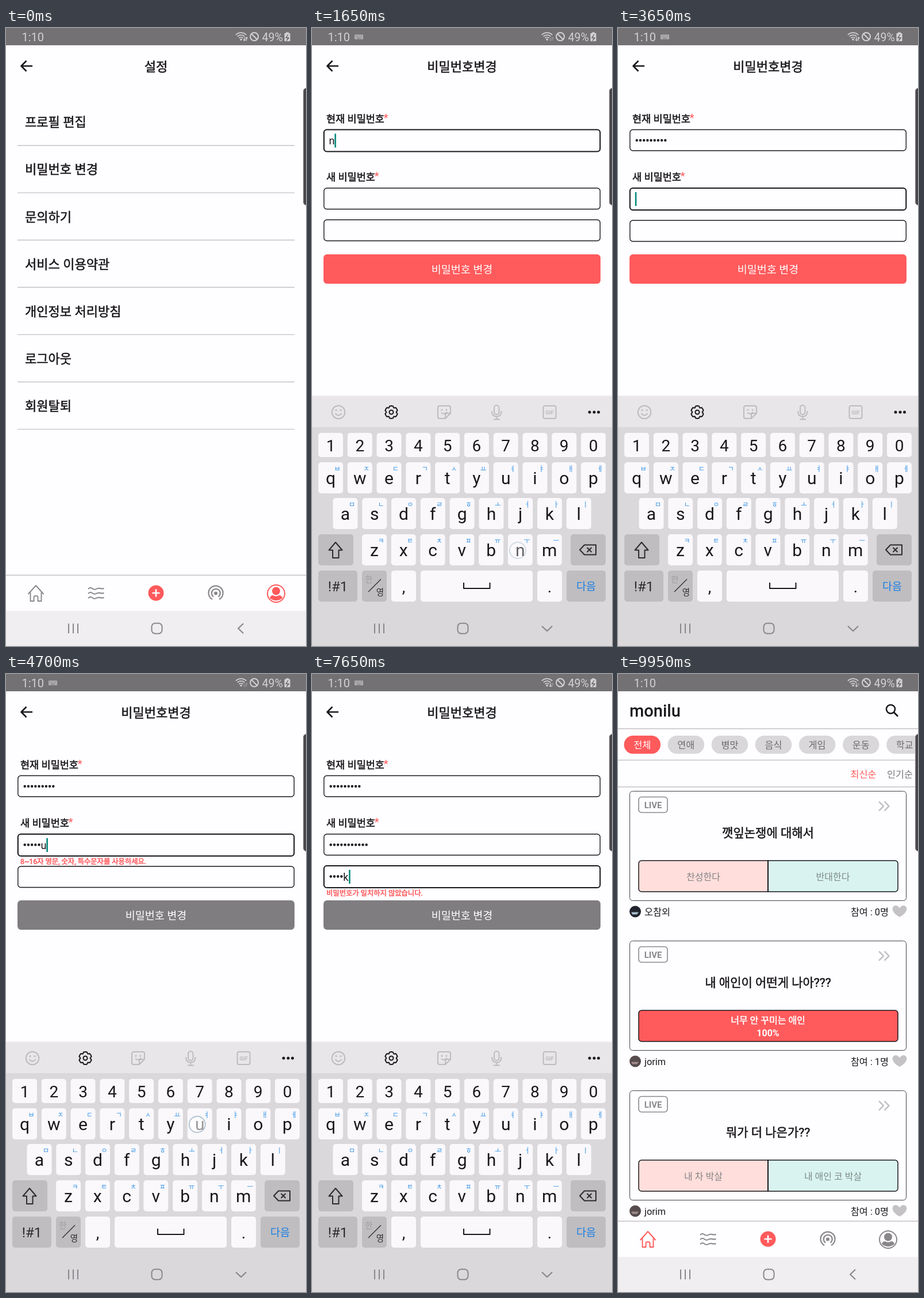
These frames come from a looping animation (522x1073 px, 10000 ms). An HTML page:

```html
<!DOCTYPE html>
<html lang="ko">
<head>
<meta charset="utf-8">
<style>
html, body { margin: 0; width: 100%; height: 100%; overflow: hidden; background: #fefdff; }
svg { display: block; width: 522px; height: 1073px; font-family: Roboto, "Noto Sans CJK KR", "Noto Sans CJK", sans-serif; }
</style>
</head>
<body>
<svg id="stage" viewBox="0 0 522 1073"></svg>
<script>
const BG = '#fefdff', RED = '#ff5a5c', GREY = '#89878b', INK = '#19171a', PALE = '#c4c2c5', KEY = '#faf8fb';
const LOOP = 10000;

// Drawing helpers
const esc = s => s.replace(/&/g, '&amp;').replace(/</g, '&lt;');
const text = (s, x, y, size, fill = INK, anchor = 'start', extra = '') =>
  `<text x="${x}" y="${y}" font-size="${size}" fill="${fill}" text-anchor="${anchor}" ${extra}>${esc(s)}</text>`;
const mid = (s, x, y, size, fill, extra) => text(s, x, y, size, fill, 'middle', extra);
const medium = (c = INK) => `stroke="${c}" stroke-width=".55"`;
const rect = (x, y, w, h, r, fill, stroke = 'none', sw = 1) =>
  `<rect x="${x}" y="${y}" width="${w}" height="${h}" rx="${r}" fill="${fill}" stroke="${stroke}" stroke-width="${sw}"/>`;
const path = (d, stroke, sw = 2, fill = 'none') =>
  `<path d="${d}" stroke="${stroke}" stroke-width="${sw}" fill="${fill}" stroke-linejoin="round"/>`;
const circle = (x, y, r, fill, stroke = 'none', sw = 2) =>
  `<circle cx="${x}" cy="${y}" r="${r}" fill="${fill}" stroke="${stroke}" stroke-width="${sw}"/>`;
const group = (body, opacity, dy = 0) => `<g opacity="${opacity}" transform="translate(0 ${dy})">${body}</g>`;
const line = (y, x1 = 0, x2 = 522) => path(`M${x1} ${y}H${x2}`, PALE, 1.4);
const page = body => rect(0, 30, 522, 982, 0, BG) + body;
const ease = (t, a, b) => { const p = Math.min(1, Math.max(0, (t - a) / (b - a))); return 1 - (1 - p) ** 3; };

// Status bar, tabs, navigation
function statusBar(t, typing) {
  const c = '#d3d1d4', busy = +'3033003111'[Math.floor(t / 1000)];
  let s = rect(0, 0, 522, 30, 0, '#737174') + text('1:10', 27.5, 22.5, 20, c) + text('49%', 445.5, 22.5, 19.5, c);
  for (const r of [13, 9, 5]) s += path(`M${409 - .7 * r} ${21 - .7 * r}A${r} ${r} 0 0 1 ${409 + .7 * r} ${21 - .7 * r}`, c, 1.8);
  s += circle(409, 20, 1.8, c);
  s += group(path('M415 16v6m-2-2l2 2l2-2', c, 1.3), busy & 1 ? 1 : .35);
  s += group(path('M418.500 22v-6m-1.500 2l1.500-2l2 2', c, 1.3), busy & 2 ? 1 : .35);
  s += circle(432, 15, 7, 'none', c) + path('M427 10L437 20', c);
  s += rect(484.500, 9, 10, 14, 1, c) + rect(487, 7.500, 5, 2, 0, c) + path('M491 11L487 17H492L488 22', '#5d5b5e', 1.3);
  if (typing) {
    s += rect(74, 11.5, 15, 8, 1, '#b5b3b6');
    for (let i = 0; i < 10; i++) s += rect(75.500 + i % 5 * 2.6, 13 + Math.floor(i / 5) * 2.4, 1.2, 1.2, 0, '#737174');
    s += rect(78, 17.600, 7, 1, 0, '#737174');
  }
  return s;
}

function tabs(home) {
  const h = home ? RED : GREY, p = home ? GREY : RED;
  let s = rect(0, 949, 522, 63, 0, BG) + line(950);
  s += path('M38.500 983L52 968L65.500 983M42.500 980V995H48.500V988Q48.500 986 52 986T55.500 988V995H61.500V980', h, 1.9);
  for (const y of [974, 982, 990]) s += path(`M143 ${y}q3.500 -4 7 -1t7 1t7 -1t6.500 0`, GREY, 2);
  s += circle(261, 981, 13.5, RED) + path('M261 974.500V987.500M254.500 981H267.500', '#fff', 2.6);
  s += path('M359 992A12.500 12.500 0 1 1 371 992M361 987.500A7.500 7.500 0 1 1 369.500 987.500', GREY, 2.3) + circle(365, 981.500, 3, GREY);
  s += circle(470, 982, 15, 'none', p, 2) + circle(470, 977.500, 7, p) + path('M459 990Q460 985 465 985Q470 988 475 985Q480 985 481 990Q470 998 459 990Z', 'none', 0, p);
  return s;
}

const navIcons = down => path('M109 1034V1051M117 1034V1051M125 1034V1051', GREY)
  + rect(253.5, 1033.5, 18, 18, 6, 'none', GREY, 2)
  + path(down ? 'M400 1038.500L409 1047L418 1038.500' : 'M413 1034L404 1042.500L413 1051', GREY, 2.2);

const header = title => path('M46 66H27M35.500 57L26.500 66L35.500 75', INK, 2.6) + mid(title, 261, 74.5, 22, INK, medium());

// Pages
const rows = ['프로필 편집', '비밀번호 변경', '문의하기', '서비스 이용약관', '개인정보 처리방침', '로그아웃', '회원탈퇴'];
const settings = page(header('설정') + rows.map((s, i) =>
  text(s, 33, 171.3 + 82.15 * i, 22, INK, 'start', medium()) + line(204 + 82.1 * i, 20, 502)).join(''));

const heart = (x, y, k, stroke, sw, fill) =>
  path(`M${x} ${y + 9.5 * k}C${x - 24 * k} ${y - 4 * k} ${x - 7 * k} ${y - 18 * k} ${x} ${y - 6 * k}C${x + 7 * k} ${y - 18 * k} ${x + 24 * k} ${y - 4 * k} ${x} ${y + 9.5 * k}Z`, stroke, sw, fill);

function card(y, title, options, user, votes, tones) {
  let s = rect(20.500, y, 481, 190, 5, BG, '#444246') + rect(36, y + 10, 50, 27, 5, 'none', GREY, 1.6);
  s += mid('LIVE', 61, y + 29.5, 15, GREY, 'font-weight="700"');
  s += path(`M454 ${y + 18}l8 8l-8 8M463.500 ${y + 18}l8 8l-8 8`, PALE, 2.5) + mid(title, 261, y + 79.5, 21, INK, medium());
  if (options.length > 1) {
    s += path(`M261 ${y + 120.5}H41a5 5 0 0 0 -5 5v44a5 5 0 0 0 5 5H261Z`, INK, 1.5, '#ffdedb');
    s += path(`M261 ${y + 120.5}H482a5 5 0 0 1 5 5v44a5 5 0 0 1 -5 5H261Z`, INK, 1.5, '#d9f4f0');
    s += path(`M261 ${y + 120}v55`, INK, 2);
    s += mid(options[0], 148.5, y + 154, 16, '#858286') + mid(options[1], 374, y + 154, 16, '#7d8886');
  } else {
    s += rect(36, y + 120.500, 451, 54, 5, RED, INK, 1.5);
    s += mid(options[0], 261, y + 143, 16, '#fff', medium('#fff')) + mid('100%', 261, y + 165.500, 16, '#fff', 'font-weight="700"');
  }
  s += circle(30, y + 209, 10, tones[0]) + path(`M23 ${y + 210}h13l-3 4h-8Z`, 'none', 0, tones[1]);
  s += text(user, 46, y + 215, 16.3) + text(`참여 : ${votes}명`, 471, y + 215, 16.3, INK, 'end');
  return s + heart(490, y + 209, 1, 'none', 0, PALE);
}

function homePage() {
  let s = text('monilu', 20, 73.5, 29, INK, 'start', 'font-weight="500"');
  s += circle(474.500, 61, 7.5, 'none', INK, 2.5) + path('M480 66.500L487 73.500', INK, 2.8);
  s += line(95) + line(149.5) + line(196);
  ['전체', '연애', '병맛', '음식', '게임', '운동', '학교'].forEach((c, i) => {
    const x = 10.500 + 76.1 * i;
    s += rect(x, 107, 63.500, 31.500, 15.7, i ? '#d9d7da' : RED) + mid(c, x + 31.7, 129, 16.3, i ? '#6d6b6e' : '#fff');
  });
  s += text('최신순', 404.5, 179.5, 16.3, RED) + text('인기순', 468, 179.5, 16.3, '#77757a');
  s += card(203.5, '깻잎논쟁에 대해서', ['찬성한다', '반대한다'], '오참외', 0, ['#20242c', '#a9bccb']);
  s += card(463.5, '내 애인이 어떤게 나아???', ['너무 안 꾸미는 애인'], 'jorim', 1, ['#574c4d', '#a08a87']);
  s += card(723.5, '뭐가 더 나은가??', ['내 차 박살', '내 애인 코 박살'], 'jorim', 0, ['#574c4d', '#a08a87']);
  return page(s) + tabs(true);
}
const home = homePage();

// Keyboard
const STEP = 50.78;
const layouts = [false, true].map(sym => [
  ['1234567890', 11, 703, 42],
  [sym ? '+×÷=/_<>♡☆' : 'qwertyuiop', 11, 754, 54, 'ㅂㅈㄷㄱㅅㅛㅕㅑㅐㅔ'],
  [sym ? '!@#~%^&*()' : 'asdfghjkl', sym ? 11 : 36.5, 816, 54, 'ㅁㄴㅇㄹㅎㅗㅓㅏㅣ'],
  [sym ? '–\'":;,?' : 'zxcvbnm', 87, 879, 54, 'ㅋㅌㅊㅍㅠㅜㅡ'],
].flatMap(([chars, x, y, h, hints]) => [...chars].map((c, i) => ({ c, x: x + STEP * i, y, h, hint: sym || !hints ? '' : hints[i] }))));

const radial = (x, y, n, r) => 'M' + Array.from({ length: n }, (_, i) => {
  const a = i / n * 2 * Math.PI - Math.PI / 2;
  return `${(x + r(i) * Math.cos(a)).toFixed(1)} ${(y + r(i) * Math.sin(a)).toFixed(1)}`;
}).join('L') + 'Z';

function glyph(k) {
  const x = k.x + 21.5, y = k.y + 28;
  if (k.c === '♡') return heart(x, y + 1, .9, INK, 2, 'none');
  if (k.c === '☆') return path(radial(x, y + 1, 10, i => i % 2 ? 5 : 12), INK, 1.8);
  return mid(k.c, x, k.y + (k.h < 50 ? 32 : 37.5), /[a-z]/.test(k.c) ? 30 : 28);
}

function keyboard(sym, pressed) {
  const dim = '#bdbbbe', special = '#bfbdc0', dark = '#2d2b2e';
  let s = rect(0, 638, 522, 2, 0, '#efedf0') + rect(0, 640, 522, 440, 0, '#dad8db') + rect(0, 640, 522, 53, 0, '#e8e6e9');
  s += circle(46, 667, 11.3, 'none', dim) + circle(42, 663.500, 1.6, dim) + circle(50, 663.500, 1.6, dim) + path('M40.500 669Q46 676 51.500 669', dim);
  s += path(radial(138, 667, 24, i => (i + 1) % 4 < 3 ? 11 : 8.5), INK, 2) + circle(138, 667, 3.5, 'none', INK);
  s += path('M222 656H238Q241 656 241 659V669L232 678H222Q219 678 219 675V659Q219 656 222 656M241 669H235Q232 669 232 672V678', dim);
  s += circle(226, 663, 1.5, dim) + circle(234, 663, 1.5, dim) + path('M225 668Q230 672 235 667', dim);
  s += rect(317, 655, 8.500, 16, 4.2, 'none', dim, 2) + path('M313 665Q313 674.500 321.300 674.500T329.500 665M321.300 674.500V680M316 679.500H327', dim);
  s += rect(402.5, 656, 22, 22, 3, 'none', dim, 2) + mid('GIF', 413.5, 670.5, 9.5, dim, 'font-weight="700"');
  for (const x of [483, 491, 498.5]) s += circle(x, 667, 2.5, INK);

  for (const k of layouts[+sym]) {
    s += rect(k.x, k.y, 43, k.h, 5, k.c === pressed ? '#a9a7aa' : KEY) + glyph(k);
    if (k.hint) s += mid(k.hint, k.x + 33, k.y + 16, 12, '#3794e6');
  }
  s += rect(11, 879, 61, 54, 5, special) + rect(450, 879, 61, 54, 5, special);
  s += sym ? mid('1/2', 41.5, 915, 24, dark) : path('M41 893L29.500 906.500H36V920H46.500V906.500H52.500Z', dark, 2);
  s += path('M474 897.500H494V914.500H474L466 906Z', dark, 2) + path('M478.500 902l8 8m0-8l-8 8', dark, 2);
  s += rect(11, 942, 68, 54, 5, special) + mid(sym ? 'ABC' : '!#1', 45, 978, 24, dark);
  s += rect(87, 942, 43, 54, 5, special) + mid('한', 99, 963, 14.5, sym ? dark : '#a09ea1') + mid('영', 118.5, 985, 14.5, dark) + path('M98 979L120 957', dark, 1.3);
  s += rect(138, 942, 43, 54, 5, KEY) + mid(',', 159.5, 980, 28) + rect(189, 942, 195, 54, 5, KEY) + path('M264 963V973H309.500V963', INK, 2);
  s += rect(392, 942, 43, 54, 5, KEY) + mid('.', 413.5, 980, 28);
  return s + rect(443, 942, 68, 54, 5, special) + mid('다음', 477, 976, 18.500, '#1a7fe4');
}

function popup(k) {
  const x = Math.max(11, Math.min(433, k.x - 17.5)), y = k.y - 110;
  return rect(x - 1, y + 1, 80, 103, 9, 'rgba(0,0,0,.1)') + rect(x, y, 78, 102, 8, KEY) + mid(k.c, x + 39, y + 68, 42);
}

// Timeline
const OPEN = 1150, CLOSE = 9680;
const fields = [
  { word: 'nodbeum1!', focus: 1100, at: [1580, 1780, 1970, 2150, 2330, 2510, 2690, 2870, 3160] },
  { word: 'sodikumen1!', focus: 3400, at: [3820, 4000, 4180, 4350, 4520, 4690, 4860, 5030, 5200, 5700, 6260] },
  { word: 'sodikumen1!', focus: 6560, at: [6880, 7040, 7190, 7330, 7480, 7800, 7960, 8130, 8320, 8600, 9000] },
];
const switches = [3010, 5930, 8770];
const symbolsAt = t => fields.some((f, i) => t >= switches[i] && t < (fields[i + 1]?.focus ?? LOOP));
const strokes = fields.flatMap(f => f.at.map((t, i) => {
  const key = layouts[+symbolsAt(t)].find(k => k.c === f.word[i]);
  return { t, key, x: key.x + 17, y: key.y + 28 };
}));
const taps = [
  { t: 450, x: 100, y: 246 }, { t: 9560, x: 261, y: 419 },
  ...fields.map((f, i) => ({ t: f.focus, x: 250, y: [196, 297, 352][i] })),
  ...switches.map(t => ({ t, x: 35, y: 962 })),
  ...strokes,
];

function form(t) {
  const active = fields.filter(f => t >= f.focus).length - 1;
  const counts = fields.map(f => f.at.filter(a => t >= a).length);
  const weak = counts[1] > 0 && counts[1] < 11, differ = counts[2] > 0 && counts[2] < 11;
  let s = header('비밀번호변경');
  s += text('현재 비밀번호', 25, 163.5, 17.5, INK, 'start', medium()) + text('새 비밀번호', 25, 265, 17.5, INK, 'start', medium());
  s += text('*', 124.5, 162, 19, RED) + text('*', 108.5, 263, 19, RED);
  fields.forEach((f, i) => {
    const on = i === active, n = counts[i], last = n ? f.at[n - 1] : f.focus;
    const y = [176.5, 278, 333][i] + (i === 2 && active === 1 ? 1 : 0), my = y + 18.5;
    s += rect(20.8, y, 480.5, on ? 38 : 36.5, 5, BG, INK, on ? 2.1 : 1.4);
    const shown = on && n && t - last < 1500, dots = shown ? n - 1 : n;
    for (let j = 0; j < dots; j++) s += circle(32.7 + 6.2 * j, my, 2.2, INK);
    let x = 30 + 6.2 * dots;
    if (shown) { s += text(f.word[n - 1], x - .5, my + 7, 18); x += 9.6; }
    if (on && (t - last) % 1000 < 500) s += rect(x - .3, my - 11.500, 2.6, 24, 0, '#00897b');
  });
  if (weak) s += text('8~16자 영문, 숫자, 특수문자를 사용하세요.', 25, 329.7, 12.3, RED, 'start', medium(RED));
  if (differ) s += text('비밀번호가 일치하지 않았습니다.', 25, 384.7, 12.3, RED, 'start', medium(RED));
  s += rect(20, 393, 482, 51, 6, weak || differ ? '#807d80' : RED) + mid('비밀번호 변경', 261, 425.7, 18.5, '#fff');
  return page(s);
}

function scene(t) {
  const enter = ease(t, 500, 780), leave = ease(t, 9680, 9880);
  const up = ease(t, OPEN, OPEN + 260) * (1 - ease(t, CLOSE, CLOSE + 200));
  const press = strokes.find(k => t >= k.t - 110 && t < k.t);
  let s = enter < 1 ? settings : '';
  if (enter > 0 && leave < 1) s += group(form(t), enter, (1 - enter) * 40);
  s += tabs(false);
  if (leave > 0) s += group(home, leave);
  s += rect(0, 1012, 522, 61, 0, '#f0eef1');
  if (up > 0) s += group(keyboard(symbolsAt(t), press?.key.c), 1, (1 - up) * 435);
  if (press) s += popup(press.key);
  s += navIcons(up > .5) + statusBar(t, up > .5);
  s += rect(517.500, 104.500, 12, 203, 5, '#4a484c', '#8d8b8e', 1);
  for (const p of taps) {
    const a = t < p.t - 110 ? 0 : 1 - Math.max(0, t - p.t) / 150;
    if (a > 0) s += group(circle(p.x, p.y, 14, 'rgba(255,255,255,.6)', '#b0c2d0', 2), a.toFixed(2));
  }
  return s;
}

const stage = document.getElementById('stage');
let start, shown;
function frame(now) {
  start ??= now;
  const next = scene((now - start) % LOOP);
  if (next !== shown) stage.innerHTML = shown = next;
  requestAnimationFrame(frame);
}
requestAnimationFrame(frame);
</script>
</body>
</html>
```
